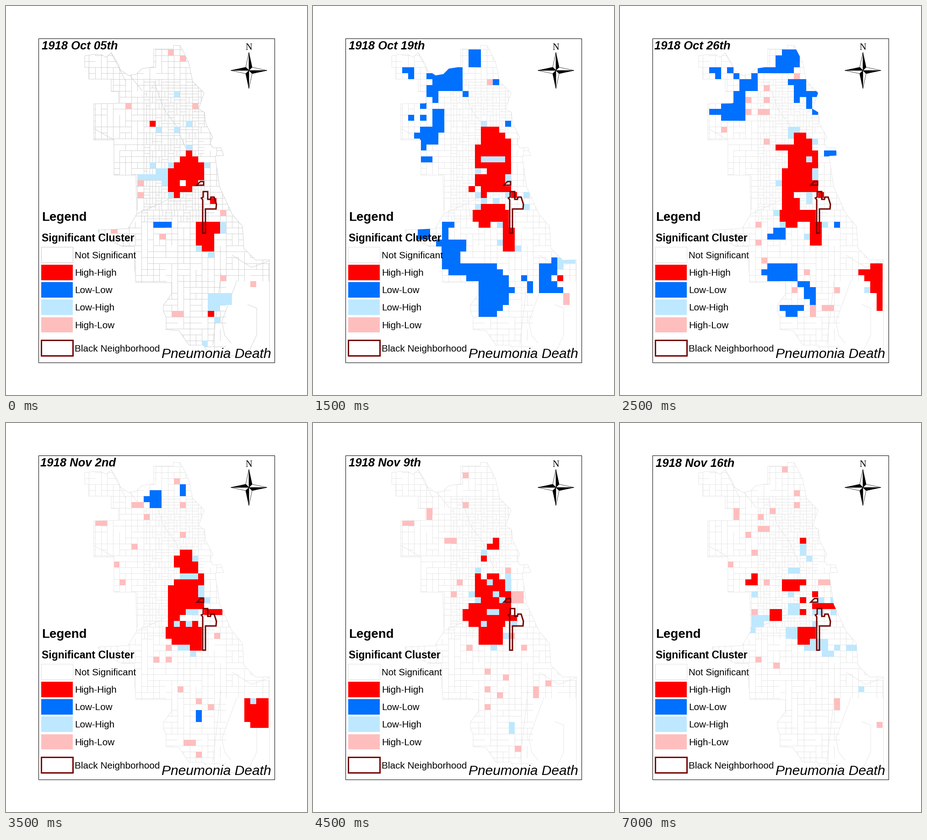
Recreate the animation shown at these times as a matplotlib script. Size 658x851 px, loop 8000 ms.

```python
import math
import random

import matplotlib.pyplot as plt
from matplotlib.animation import FuncAnimation
from matplotlib.collections import LineCollection, PolyCollection
from matplotlib.patches import Polygon
from matplotlib.path import Path

W, H = 658, 851
HH, LL, LH, HL = "#ff0000", "#0070ff", "#bee8ff", "#ffbebe"
WHITE, MAROON = "#ffffff", "#730000"

# Half-mile street lattice
X0, Y0, DX, DY = 168, 107.5, 13.25, 13
COLS, ROWS = range(32), range(-2, 51)

fig = plt.figure(figsize=(W / 72, H / 72), dpi=72, facecolor="white")
ax = fig.add_axes([0, 0, 1, 1])
ax.set_xlim(0, W)
ax.set_ylim(H, 0)
ax.axis("off")


def points(xy):
    """Four numbers make a box, more make a polygon."""
    if len(xy) == 4:
        x0, y0, x1, y1 = xy
        xy = (x0, y0, x1, y0, x1, y1, x0, y1)
    return list(zip(xy[::2], xy[1::2]))


def shape(xy, fill="none", line="none", width=0, z=5):
    return ax.add_patch(Polygon(points(xy), closed=True, fc=fill, ec=line,
                                lw=width, zorder=z))


def label(x, y, text, size, **style):
    style.setdefault("family", "Liberation Sans")
    return ax.text(x, y, text, fontsize=size, va="baseline", zorder=6, **style)


def corner(i, j):
    """The lattice jogs west below the middle of the city."""
    return X0 + DX * i - (5 if j >= 26 else 0), Y0 + DY * j


def block(i, j):
    x, y = corner(i, j)
    return [(x, y), (x + DX, y), (x + DX, y + DY), (x, y + DY)]


def block_at(x, y):
    j = math.floor((y - Y0) / DY)
    return math.floor((x - corner(0, j)[0]) / DX), j


# City limits
north_west = [(366, 94), (323, 94), (323, 133), (297, 137), (285, 149),
              (268, 152), (250, 140), (246, 128), (230, 102), (219, 112),
              (207, 106), (190, 106), (172, 109), (172, 134), (181, 134),
              (181, 160), (230, 160), (230, 187), (246, 187), (246, 213),
              (192, 214), (192, 293), (236, 293), (236, 370), (284, 370)]
south = [(286, 455), (267, 487), (201, 490), (206, 503), (254, 526), (281, 526),
         (281, 566), (284, 605), (362, 605), (362, 630), (344, 655), (344, 668),
         (350, 681), (350, 708), (378, 710), (400, 742), (432, 742), (440, 755),
         (500, 766), (576, 766), (576, 555), (546, 556), (520, 530)]
lakefront = [(517, 482), (494, 455), (467, 396), (457, 328), (476, 327),
             (470, 310), (452, 310), (446, 300), (452, 287), (437, 258),
             (434, 233), (421, 225), (427, 208), (433, 190), (408, 165),
             (399, 122), (381, 87), (366, 86)]
roads = [[(192, 268), (236, 293)], [(286, 455), (344, 428), (400, 402)],
         [(262, 141), (298, 186)], [(229, 101), (262, 165)],
         [(323, 165), (345, 225), (372, 262), (395, 316)],
         [(505, 600), (472, 690), (478, 720), (492, 738)],
         [(494, 545), (537, 572), (576, 557)], [(470, 585), (452, 742)],
         [(528, 653), (548, 661), (548, 720), (526, 766)]]

# Streets: each mile square is halved again and again, finer downtown
rng = random.Random(18)
streets = []


def split(x, y, w, h, area):
    if w * h <= area * rng.uniform(0.7, 1.7):
        return
    if w > h * rng.uniform(0.7, 1.3):
        c = x + w / 2
        streets.append([(c, y), (c, y + h)])
        split(x, y, w / 2, h, area)
        split(c, y, w / 2, h, area)
    else:
        c = y + h / 2
        streets.append([(x, c), (x + w, c)])
        split(x, y, w, h / 2, area)
        split(x, c, w, h / 2, area)


for j in ROWS[::2]:
    for i in COLS[::2]:
        x, y = corner(i, j)
        if x > 465 and y > 590:
            continue
        dense = 280 < x < 430 and 155 < y < 450
        keep = 0.97 if dense else 0.82
        if rng.random() < keep:
            streets.append([(x, y), (x + 2 * DX, y)])
        if rng.random() < keep:
            streets.append([(x, y), (x, y + 2 * DY)])
        split(x, y, 2 * DX, 2 * DY, 115 if dense else 300)

city = ax.add_patch(Polygon(north_west + south + lakefront, closed=True,
                            fc="none", lw=0.8, zorder=1))
tracts = LineCollection(streets + roads, linewidths=0.8, zorder=1)
fills = PolyCollection([], linewidths=0, antialiaseds=False, zorder=2)
for layer in (tracts, fills):
    ax.add_collection(layer)
    layer.set_clip_path(city)

# Clusters: a few key points per area, filled block by block
cells = [(i, j) for j in ROWS for i in COLS]
centres = [(x + DX / 2, y + DY / 2) for x, y in (corner(i, j) for i, j in cells)]
weeks = []


def week(date, x=78, y=95, head=23.0):
    weeks.append({"date": date, "at": (x, y), "head": head, "map": {}})


def zone(color, *xy):
    inside = Path(points(xy)).contains_points(centres)
    weeks[-1]["map"].update((c, color) for c, hit in zip(cells, inside) if hit)


def spots(color, *xy):
    for x, y in zip(xy[::2], xy[1::2]):
        weeks[-1]["map"][block_at(x, y)] = color


def fringe(share):
    """Low-High blocks are scattered along the edge of High-High areas."""
    near = weeks[-1]["map"]
    red = [c for c, color in near.items() if color == HH]
    edge = {(i + di, j + dj) for i, j in red
            for di, dj in ((1, 0), (-1, 0), (0, 1), (0, -1))}
    for c in sorted(edge - set(near)):
        if rng.random() < share:
            near[c] = LH


week("1918 Oct 05th")
zone(HH, 393, 315, 407, 315, 434, 355, 425, 392, 385, 405, 385, 420, 367, 420,
     350, 380, 350, 352, 383, 340)
zone(HH, 419, 472, 464, 466, 464, 490, 444, 497, 458, 520, 452, 536, 434, 536,
     419, 522)
fringe(0.3)
spots(HH, 320, 255, 447, 424, 452, 673)
spots(WHITE, 393, 387)
zone(LH, 310, 342, 349, 352, 349, 388, 284, 383, 284, 370, 330, 365)
zone(LH, 443, 628, 494, 627, 490, 655, 443, 667)
spots(LH, 376, 194, 330, 270, 376, 270, 398, 257, 467, 686, 438, 735)
zone(LL, 319, 471, 358, 484)
spots(HL, 361, 100, 392, 118, 266, 220, 414, 214, 294, 389, 300, 415, 478, 448,
      240, 496, 340, 506, 472, 592, 542, 602, 372, 675, 384, 675)

week("1918 Oct 12th")
zone(HH, 385, 276, 411, 276, 425, 303, 434, 366, 434, 405, 385, 400, 385, 418,
     418, 420, 424, 457, 417, 471, 359, 471, 370, 422, 344, 408, 360, 330,
     341, 318, 348, 290)
fringe(0.3)
spots(HH, 437, 411, 437, 424, 455, 437, 407, 556, 339, 347)
zone(LH, 408, 328, 420, 350)
spots(LH, 460, 412, 472, 437, 441, 518, 441, 530, 295, 245, 393, 412, 329, 322)
zone(LL, 272, 162, 297, 140, 297, 159, 336, 133, 349, 133, 337, 186, 272, 186)
zone(LL, 213, 227, 246, 227, 246, 252, 227, 252, 227, 277, 260, 277, 260, 292,
     213, 292)
zone(LL, 254, 500, 287, 487, 306, 500, 320, 538, 367, 538, 387, 564, 387, 602,
     369, 602, 369, 577, 335, 593, 309, 593, 309, 560, 281, 527, 255, 527)
zone(LL, 482, 655, 548, 655, 548, 718, 526, 740, 490, 733, 472, 695)
zone(LL, 365, 668, 417, 693)
spots(LL, 238, 145, 252, 155, 355, 112, 297, 481, 375, 617, 459, 592, 448, 607,
      434, 634)
zone(HL, 536, 572, 576, 558, 576, 604, 550, 625)
spots(HL, 329, 114, 381, 139, 305, 206, 276, 212, 254, 262, 278, 294, 326, 490,
      346, 528, 421, 590, 408, 620, 405, 648, 405, 713, 480, 615, 568, 659)

week("1918 Oct 19th")
zone(HH, 367, 263, 391, 263, 426, 290, 434, 354, 425, 392, 434, 404, 385, 400,
     385, 418, 367, 420, 353, 368, 382, 362, 358, 354, 358, 342, 363, 291)
zone(HH, 370, 434, 418, 434, 430, 444, 438, 524, 432, 536, 413, 536, 411, 472,
     370, 485, 352, 471, 352, 446)
fringe(0.2)
spots(HH, 354, 310, 347, 400, 441, 411, 544, 592)
zone(LH, 367, 328, 420, 342)
zone(LH, 525, 549, 576, 556, 537, 572)
spots(LH, 361, 412, 361, 436, 460, 412, 472, 437, 429, 373, 429, 386, 531, 582)
zone(LL, 247, 187, 258, 160, 241, 146, 285, 148, 297, 136, 336, 133, 336, 107,
     349, 95, 367, 95, 367, 132, 324, 135, 330, 180, 272, 187, 272, 212,
     260, 212)
zone(LL, 192, 127, 216, 127, 217, 156, 193, 140)
zone(LL, 234, 258, 260, 258, 260, 227, 290, 225, 279, 278, 273, 304, 248, 304,
     223, 290)
zone(LL, 229, 485, 254, 511)
zone(LL, 279, 471, 306, 475, 287, 514, 333, 514, 333, 538, 254, 527, 280, 510)
zone(LL, 282, 540, 321, 540, 321, 564, 388, 564, 414, 577, 427, 604, 427, 641,
     418, 667, 388, 682, 364, 682, 362, 604, 284, 577)
zone(LL, 493, 575, 525, 549, 540, 547, 525, 599, 547, 625, 493, 624)
spots(LL, 240, 220, 240, 245, 217, 250, 241, 311, 241, 337, 254, 337, 333, 191,
      400, 164, 427, 252, 435, 615, 459, 592, 480, 608, 480, 620)
spots(HL, 384, 165, 556, 631, 556, 644)

week("1918 Oct 26th", 75, 95, 22.75)
zone(HH, 382, 277, 406, 277, 425, 316, 434, 354, 434, 404, 390, 402, 384, 418,
     396, 434, 390, 444, 430, 440, 437, 497, 434, 523, 419, 523, 412, 472,
     367, 485, 352, 471, 354, 368, 368, 342, 370, 316)
fringe(0.08)
zone(HH, 526, 574, 576, 558, 576, 660, 562, 660, 551, 612, 526, 590)
spots(HH, 347, 309, 360, 309, 441, 411)
spots(LH, 374, 275, 413, 334, 429, 360, 429, 375, 413, 412, 413, 425, 545, 617)
zone(LL, 336, 107, 383, 95, 396, 106, 400, 130, 376, 145, 299, 146, 297, 186,
     272, 187, 272, 252, 220, 252, 220, 214, 247, 214, 247, 187, 272, 160,
     297, 140, 336, 133)
zone(LL, 192, 127, 216, 127, 217, 156, 193, 140)
zone(LL, 371, 159, 396, 146, 408, 168, 396, 210, 378, 210)
zone(LL, 400, 180, 433, 192, 424, 209, 400, 209)
zone(LL, 440, 310, 476, 327)
zone(LL, 333, 486, 358, 511)
zone(LL, 322, 564, 394, 564, 388, 602, 362, 602, 309, 592)
zone(LL, 389, 602, 414, 602, 428, 614, 428, 654, 415, 654, 405, 627)
zone(LL, 344, 655, 398, 655, 391, 682, 367, 682)
spots(LL, 199, 233, 212, 233, 240, 145, 254, 156, 417, 222, 423, 235, 476, 476,
      326, 505)
spots(HL, 281, 206, 318, 181, 318, 208, 284, 232, 306, 232, 318, 232, 228, 272,
      323, 296, 297, 481, 297, 520, 315, 550, 407, 581, 375, 615, 480, 615)
spots(HL, 382, 153, 423, 661, 423, 674, 448, 661, 459, 661)

week("1918 Nov 2nd", 75)
zone(HH, 382, 277, 406, 277, 425, 329, 434, 354, 434, 404, 390, 402, 385, 420,
     424, 432, 430, 470, 424, 497, 373, 485, 352, 471, 354, 368, 368, 342,
     380, 329, 363, 310, 363, 291)
fringe(0.08)
zone(HH, 437, 406, 474, 418)
zone(HH, 519, 600, 576, 603, 576, 660, 528, 660)
zone(LH, 380, 328, 420, 342)
zone(LH, 393, 405, 423, 419)
spots(LH, 367, 438, 400, 438, 429, 360, 429, 373, 392, 491, 412, 504, 541, 602)
spots(WHITE, 387, 425, 400, 425)
zone(LL, 298, 159, 337, 147, 337, 185, 298, 174)
zone(LL, 376, 132, 389, 158)
zone(LL, 415, 628, 428, 654)
spots(HL, 370, 125, 384, 178, 279, 180, 291, 180, 305, 206, 199, 220, 212, 220,
      381, 243, 277, 274, 242, 311, 257, 351, 466, 463, 353, 492, 326, 519)
spots(HL, 353, 519, 378, 582, 421, 608, 448, 621, 399, 700, 410, 700, 426, 727)

week("1918 Nov 9th", 78, 95, 22.75)
zone(HH, 347, 329, 406, 328, 422, 354, 432, 392, 441, 430, 424, 440, 411, 484,
     379, 485, 359, 472, 359, 446, 332, 432, 332, 408, 352, 380)
fringe(0.2)
spots(HH, 386, 270, 397, 270, 397, 257, 374, 295)
zone(LH, 385, 405, 405, 419)
spots(LH, 367, 438, 388, 348, 360, 386, 400, 373, 411, 386, 428, 335, 428, 348,
      376, 283, 435, 661, 435, 674)
spots(WHITE, 374, 335)
zone(HL, 436, 362, 466, 393)
spots(HL, 329, 114, 328, 181, 253, 193, 253, 206, 199, 220, 212, 220, 288, 258,
      308, 262, 429, 322, 319, 349, 310, 376, 340, 492, 467, 492, 440, 470)
spots(HL, 380, 546, 421, 558, 378, 582, 408, 595, 375, 617, 485, 580, 485, 592,
      511, 566, 449, 718)

week("1918 Nov 16th", 78, 96.5, 22.75)
zone(HH, 358, 342, 388, 367)
zone(HH, 415, 393, 468, 406)
zone(HH, 384, 446, 434, 446, 434, 470, 418, 472, 404, 497, 385, 472)
fringe(0.25)
zone(HH, 274, 342, 300, 356)
zone(HH, 331, 407, 354, 434)
spots(HH, 292, 337, 397, 348, 429, 372, 405, 386, 400, 412, 397, 256)
zone(LH, 285, 421, 331, 421, 331, 434, 286, 455)
zone(LH, 367, 394, 388, 420)
zone(LH, 365, 446, 385, 471)
zone(LH, 412, 472, 457, 497)
zone(LH, 437, 497, 464, 511)
spots(LH, 399, 270, 405, 282, 419, 295, 374, 322, 387, 322, 293, 376, 460, 412,
      480, 497, 495, 491, 510, 491, 531, 582)
spots(HL, 361, 100, 382, 152, 384, 178, 333, 191, 305, 206, 253, 193, 253, 206,
      306, 232, 318, 232, 286, 245, 293, 281, 242, 311, 319, 349, 442, 347)
spots(HL, 455, 347, 290, 412, 297, 520, 346, 528, 480, 608, 480, 620, 568, 659)

# Outlined neighbourhood
shape((417, 392, 425, 384, 432, 384, 432, 392), "none", MAROON, 3, 4)
shape((427, 420, 431, 418, 431, 406, 441, 406, 441, 423, 447, 423, 448, 418,
       455, 418, 460, 434, 459, 444, 436, 444, 436, 497, 430, 497, 430, 424),
      "none", MAROON, 3, 4)

# Legend
shape((71, 71, 587, 780), "none", "black", 1)
label(78, 470.5, "Legend", 27.6, weight="bold")
heading = label(78, 515.5, "Significant Cluster", 23, weight="bold")
blank = shape((77, 527, 146, 561), WHITE, WHITE, 1)
first = label(150, 551.5, "Not Significant", 20.7)
for k, (color, name) in enumerate([(HH, "High-High"), (LL, "Low-Low"),
                                   (LH, "Low-High"), (HL, "High-Low")]):
    top = 566 + 38.2 * k
    shape((77, top, 146, top + 33.5), color)
    label(150, top + 24, name, 20.6)
shape((77, 731, 146, 765), WHITE, MAROON, 3)
label(150, 755.5, "Black Neighborhood", 20.6)
label(340, 769.5, "Pneumonia Death", 30, style="italic")
title = label(78, 95, "", 25.6, weight="bold", style="italic")

# Compass rose
cx, cy, tip, hub = 531, 141, 39.5, 7
label(cx, 96, "N", 20.5, family="Liberation Serif", ha="center")
for dx, dy in ((0, -1), (1, 0), (0, 1), (-1, 0)):
    end = (cx + tip * dx, cy + tip * dy)
    for side, fill in ((1, "black"), (-1, "white")):
        notch = (cx + hub * (dx - side * dy), cy + hub * (dy + side * dx))
        shape((cx, cy, *end, *notch), fill, "black", 0.7)


def draw(i):
    # The first week lasts one step, the others two, the last one stays
    w = weeks[min((i + 1) // 2, len(weeks) - 1)]
    fills.set_verts([block(*c) for c in w["map"]])
    fills.set_facecolor(list(w["map"].values()))
    title.set_text(w["date"])
    title.set_position(w["at"])
    heading.set_fontsize(w["head"])
    first.set_fontsize(w["head"] * 0.9)
    gray = "#c8c8c8" if w is weeks[0] else "#e0e0e0"
    tracts.set_color(gray)
    for patch in (city, blank):
        patch.set_edgecolor(gray)
    return []


anim = FuncAnimation(fig, draw, frames=16, init_func=lambda: draw(0),
                     interval=500, repeat=True, repeat_delay=0, blit=False)
plt.show()
```
